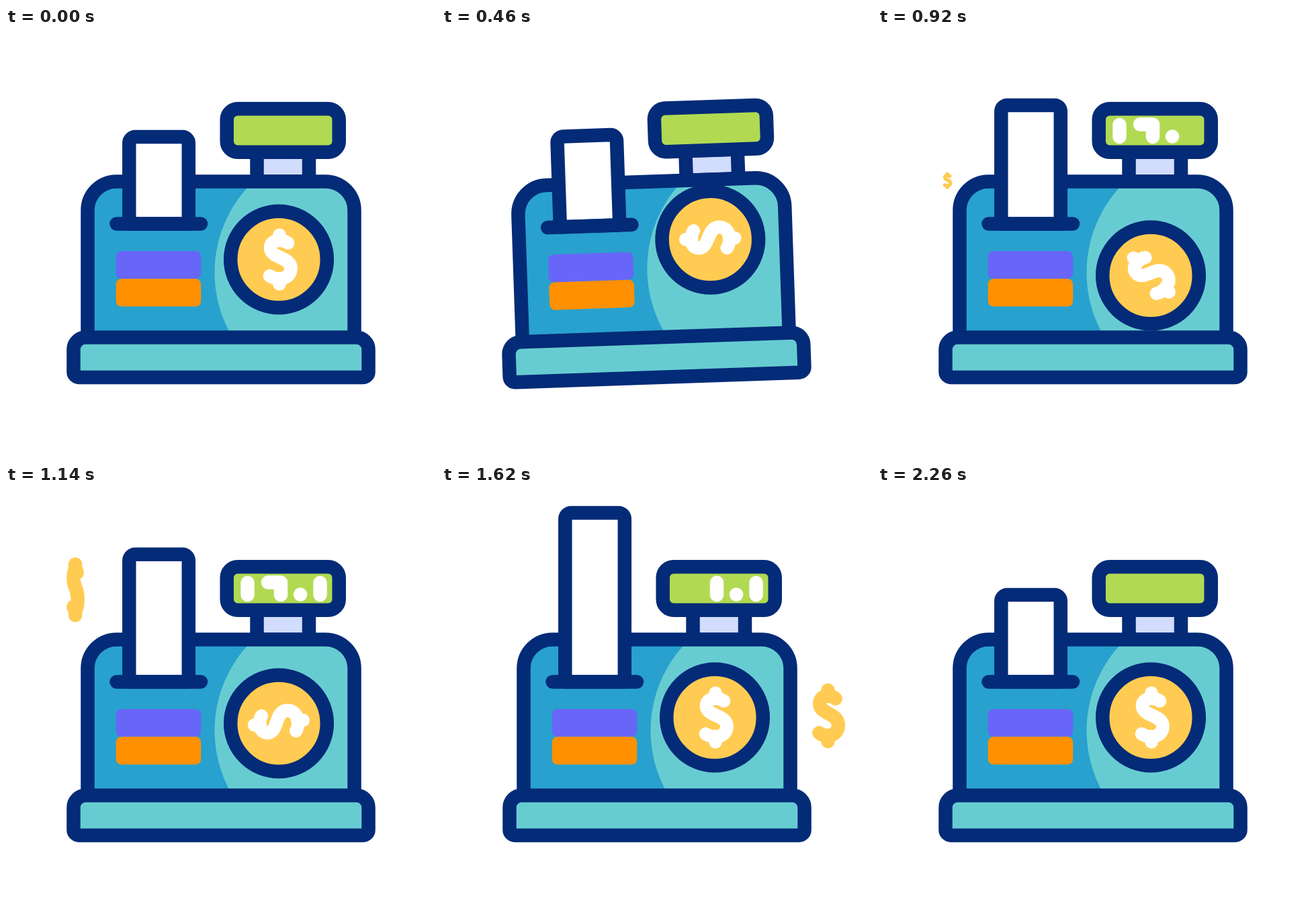
An HTML page with a canvas for the animation above (2.4 s loop, 640 by 640 pixels).

```html
<!DOCTYPE html>
<html lang="en">
<head>
<meta charset="utf-8">
<title>Cash register</title>
<style>
  html, body { margin: 0; width: 100%; height: 100%; overflow: hidden; background: #fff; }
  canvas { display: block; width: 100vmin; height: 100vmin; margin: 0 auto; }
</style>
</head>
<body>
<canvas id="stage" width="640" height="640"></canvas>
<script>
const ctx = document.getElementById('stage').getContext('2d');
const LOOP = 2400;
const STROKE = 20.5;
const NAVY = '#042b77', BLUE = '#28a1ce', TEAL = '#67ccd1', GOLD = '#ffcb52';
const LIME = '#b1da52', LILAC = '#d2dcfd', PURPLE = '#6866f8', ORANGE = '#ff9000', WHITE = '#fff';

const dollarPath = new Path2D(
  'M1-36.5V-28 M1 36.5V28 M13.5-24.5C7-30-12.5-31-12.5-17C-12.5-2 18-4 18 13C18 30-3 32-13.5 24.5');

const digits = [
  { path: new Path2D('M359.5 162V144'), length: 18 },
  { path: new Path2D('M390 143.5H409V162'), length: 37.5 },
  { path: new Path2D('M438 161.5h.1'), length: 0.1 },
  { path: new Path2D('M467.5 162V144'), length: 18 }
];

const clamp = v => Math.max(0, Math.min(1, v));
const rad = deg => deg * Math.PI / 180;

// Eased change by `amount` between two times; sum several to chain moves
function move(t, start, end, amount) {
  const u = clamp((t - start) / (end - start));
  return amount * u * u * (3 - 2 * u);
}

const tilt = t => move(t, 0, 320, -8) + move(t, 340, 570, 11.2)
  + move(t, 570, 760, -4) + move(t, 760, 900, 0.8);

const coinDrop = t => move(t, 20, 400, -27) + move(t, 460, 720, 57) + move(t, 740, 1365, -30);

// Two equal swings to the left and back
function coinSwing(t) {
  const swings = clamp((t - 40) / 1420) * 2;
  return -98 * (1 - Math.cos(swings * 2 * Math.PI)) / 2;
}

const paperRise = t => move(t, 300, 1200, 61) + move(t, 1200, 1725, 68) + move(t, 1725, 2230, -129);

function outline(width = STROKE) {
  ctx.strokeStyle = NAVY;
  ctx.lineWidth = width;
  ctx.stroke();
}

function box(x, y, w, h, radii, fill, outlined) {
  ctx.beginPath();
  ctx.roundRect(x, y, w, h, radii);
  ctx.fillStyle = fill;
  ctx.fill();
  if (outlined) outline();
}

// The stroke keeps its weight while the shape narrows
function dollar(x, y, angle, turn, size, color) {
  const shape = new Path2D();
  shape.addPath(dollarPath, new DOMMatrix().scale(turn, 1));
  ctx.save();
  ctx.translate(x, y);
  ctx.rotate(angle);
  ctx.scale(size, size);
  ctx.strokeStyle = color;
  ctx.lineWidth = 19.7;
  ctx.stroke(shape);
  ctx.restore();
}

function drawDisplay(t) {
  box(373.5, 184.6, 77.5, 44, 0, LILAC, true);
  box(328.7, 120.2, 167, 64.6, 16, LIME, true);
  ctx.save();
  ctx.strokeStyle = WHITE;
  ctx.lineWidth = STROKE;
  digits.forEach(({ path, length }, i) => {
    const shown = clamp((t - 700 - i * 100) / 100);
    const erased = clamp((t - 1470 - i * 100) / 100);
    if (erased >= shown) return;
    ctx.setLineDash([(shown - erased) * length, 100]);
    ctx.lineDashOffset = -erased * length;
    ctx.stroke(path);
  });
  ctx.restore();
}

function drawBody() {
  const shell = () => {
    ctx.beginPath();
    ctx.roundRect(121.5, 228.5, 397, 240, [43, 43, 0, 0]);
  };
  ctx.save();
  shell();
  ctx.clip();
  ctx.fillStyle = BLUE;
  ctx.fillRect(110, 218, 420, 260);
  ctx.fillStyle = TEAL;
  ctx.beginPath();
  ctx.arc(498.5, 364, 188, 0, 2 * Math.PI);
  ctx.fill();
  ctx.restore();
  shell();
  outline();
}

function drawReceipt(t) {
  const rise = paperRise(t);
  box(183.3, 162 - rise, 88.5, 129.5 + rise, [9, 9, 0, 0], WHITE, true);
  ctx.beginPath();
  ctx.moveTo(164.5, 291.5);
  ctx.lineTo(290, 291.5);
  outline();
}

function drawCoin(t) {
  const y = 344.5 + coinDrop(t);
  ctx.beginPath();
  ctx.arc(406, y, 71.8, 0, 2 * Math.PI);
  ctx.fillStyle = GOLD;
  ctx.fill();
  outline();
  dollar(406, y, rad(coinSwing(t)), 1, 1, WHITE);
}

function drawFloatingDollar(t, start, x, y) {
  const age = t - start, life = 600;
  if (age <= 0 || age >= life) return;
  const size = 1.04 * clamp(age / 80) * clamp((life - age) / 110);
  dollar(x, y - 0.33 * age, 0, Math.cos(age * 0.0057), size, GOLD);
}

function draw(t) {
  ctx.fillStyle = WHITE;
  ctx.fillRect(0, 0, 640, 640);
  ctx.lineCap = ctx.lineJoin = 'round';

  drawFloatingDollar(t, 900, 103, 234);
  drawFloatingDollar(t, 1530, 573.5, 372);

  ctx.save();
  ctx.translate(320, 511);
  ctx.rotate(rad(tilt(t)));
  ctx.translate(-320, -511);
  drawDisplay(t);
  drawBody();
  drawReceipt(t);
  box(163.7, 332, 126.5, 41.3, 8, PURPLE);
  box(163.7, 373.3, 126.5, 41.2, 8, ORANGE);
  box(100.5, 460.4, 439, 59.5, [18, 18, 8, 8], TEAL, true);
  drawCoin(t);
  ctx.restore();
}

const begin = performance.now();
function tick() {
  draw((performance.now() - begin) % LOOP);
  requestAnimationFrame(tick);
}
tick();
</script>
</body>
</html>
```
